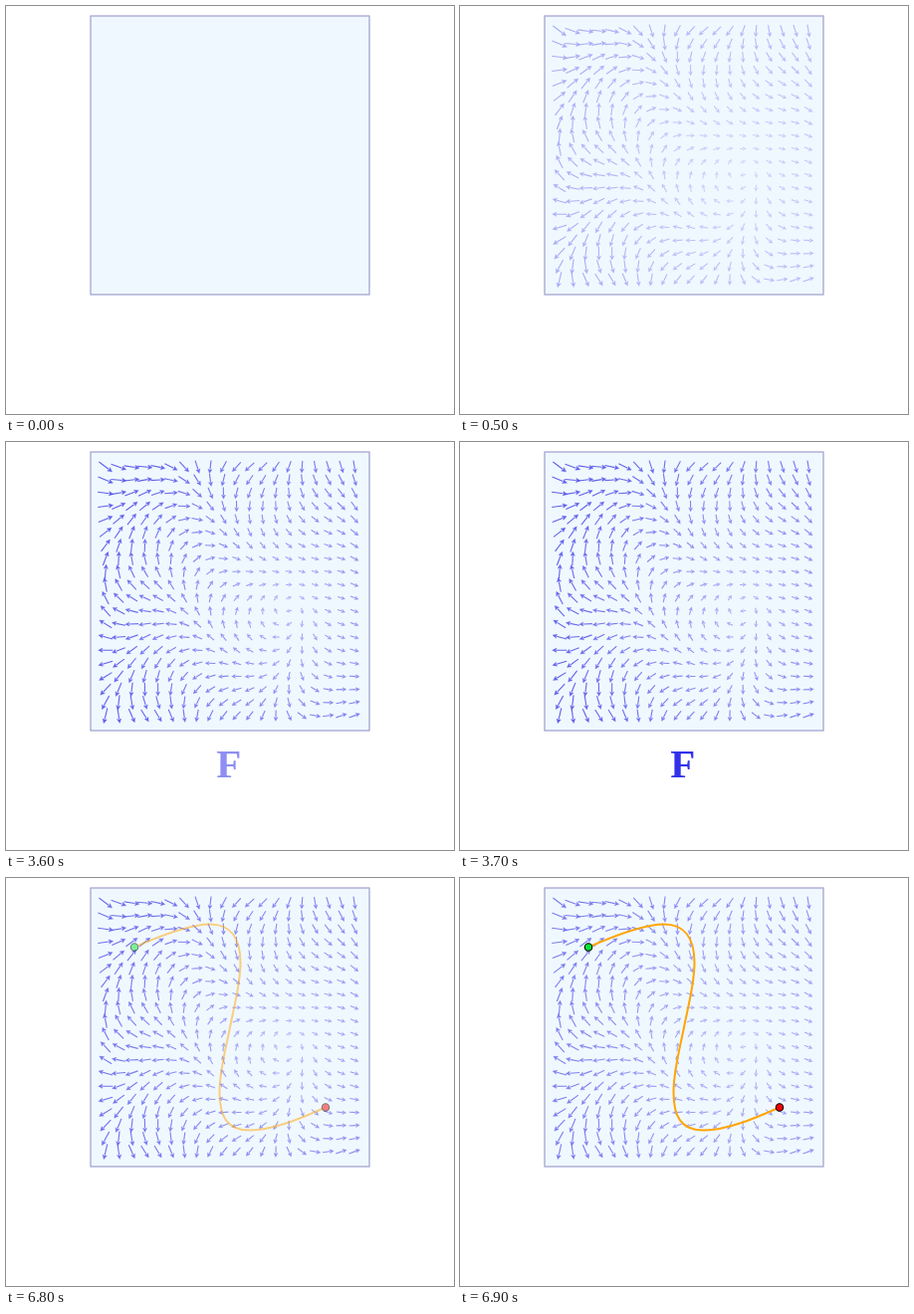
An HTML page that plays this animation: 450x410 px, repeating every 8 s.

```html
<!DOCTYPE html>
<html lang="en">
<head>
<meta charset="utf-8">
<title>Vector field and curve</title>
<style>
  html, body { margin: 0; width: 100%; height: 100%; overflow: hidden; background: #fff; }
  svg { display: block; width: 450px; height: 410px; }
  .box { fill: #f0f8ff; stroke: #a5a5d2; stroke-width: 1.3; }
  #field, .label, .curve { animation: 8s step-end infinite; }
  #field { animation-name: field; }
  #field path { fill: #5050e8; stroke: #5050e8; stroke-width: 1.1; }
  .label {
    animation-name: label;
    font: bold 41px "Liberation Serif", "Times New Roman", serif;
    fill: #3232eb;
    text-anchor: middle;
  }
  .curve { animation-name: curve; }
  .curve path { fill: none; stroke: #ffa500; stroke-width: 2; }
  .curve circle { stroke: #000; stroke-width: 1.1; }

  @keyframes field {
    0% { opacity: 0; }
    6.25% { opacity: .5; }
    7.5% { opacity: 1; }
    85% { opacity: .9; }
    86.25%, 100% { opacity: .82; }
  }
  @keyframes label {
    0% { opacity: 0; }
    45% { opacity: .55; }
    46.25% { opacity: 1; }
    83.75% { opacity: .55; }
    85%, 100% { opacity: 0; }
  }
  @keyframes curve {
    0% { opacity: 0; }
    85% { opacity: .5; }
    86.25%, 100% { opacity: 1; }
  }
</style>
</head>
<body>
<svg viewBox="0 0 450 410">
  <rect class="box" x="85" y="10" width="280" height="280"/>
  <g id="field"></g>
  <text class="label" x="223.8" y="336.5">F</text>
  <g class="curve">
    <path d="M129 69.5C155 58 185 46.5 205 46.5S235.5 60 235.5 85C235.5 107 229 129 225 150S214.5 193 214.5 215C214.5 240 222 253.5 245 253.5S295 242 321 230.5"/>
    <circle cx="129" cy="69.5" r="3.7" fill="#00e632"/>
    <circle cx="321" cy="230.5" r="3.7" fill="#f00"/>
  </g>
</svg>
<script>
  const COUNT = 20, SPAN = 250, EXTENT = 8;
  const vortex = { x: 1.94, y: 0.42 };

  // A vortex whose direction is twisted by a wave in x and a steady turn in y.
  function sample(x, y) {
    const dx = x - vortex.x, dy = y - vortex.y;
    return {
      angle: Math.atan2(dy, dx) + 1.4 - 0.494 * y + 0.9 * Math.cos(x - 0.46),
      distance: Math.hypot(dx, dy)
    };
  }

  function arrow(col, row) {
    const u = col / (COUNT - 1) - 0.5, v = row / (COUNT - 1) - 0.5;
    const { angle, distance } = sample(u * EXTENT, v * EXTENT);
    const half = (5.5 + 1.5 * distance) / 2;
    const head = 3.4 + 0.15 * distance, wing = head * 0.5;
    const neck = half - head;
    const path = document.createElementNS("http://www.w3.org/2000/svg", "path");
    path.setAttribute("d", `M${-half} 0H${neck}`);
    const tip = path.cloneNode();
    tip.setAttribute("d", `M${half} 0L${neck} ${-wing}L${neck + 0.7} 0L${neck} ${wing}Z`);
    tip.style.strokeWidth = 0.3;
    const group = document.createElementNS("http://www.w3.org/2000/svg", "g");
    group.setAttribute("transform",
      `translate(${225 + u * SPAN} ${150 + v * SPAN}) rotate(${angle * 180 / Math.PI})`);
    group.setAttribute("opacity", Math.min(0.9, 0.4 + 0.08 * distance));
    group.append(path, tip);
    return group;
  }

  const field = document.getElementById("field");
  for (let row = 0; row < COUNT; row++)
    for (let col = 0; col < COUNT; col++) field.append(arrow(col, row));
</script>
</body>
</html>
```
